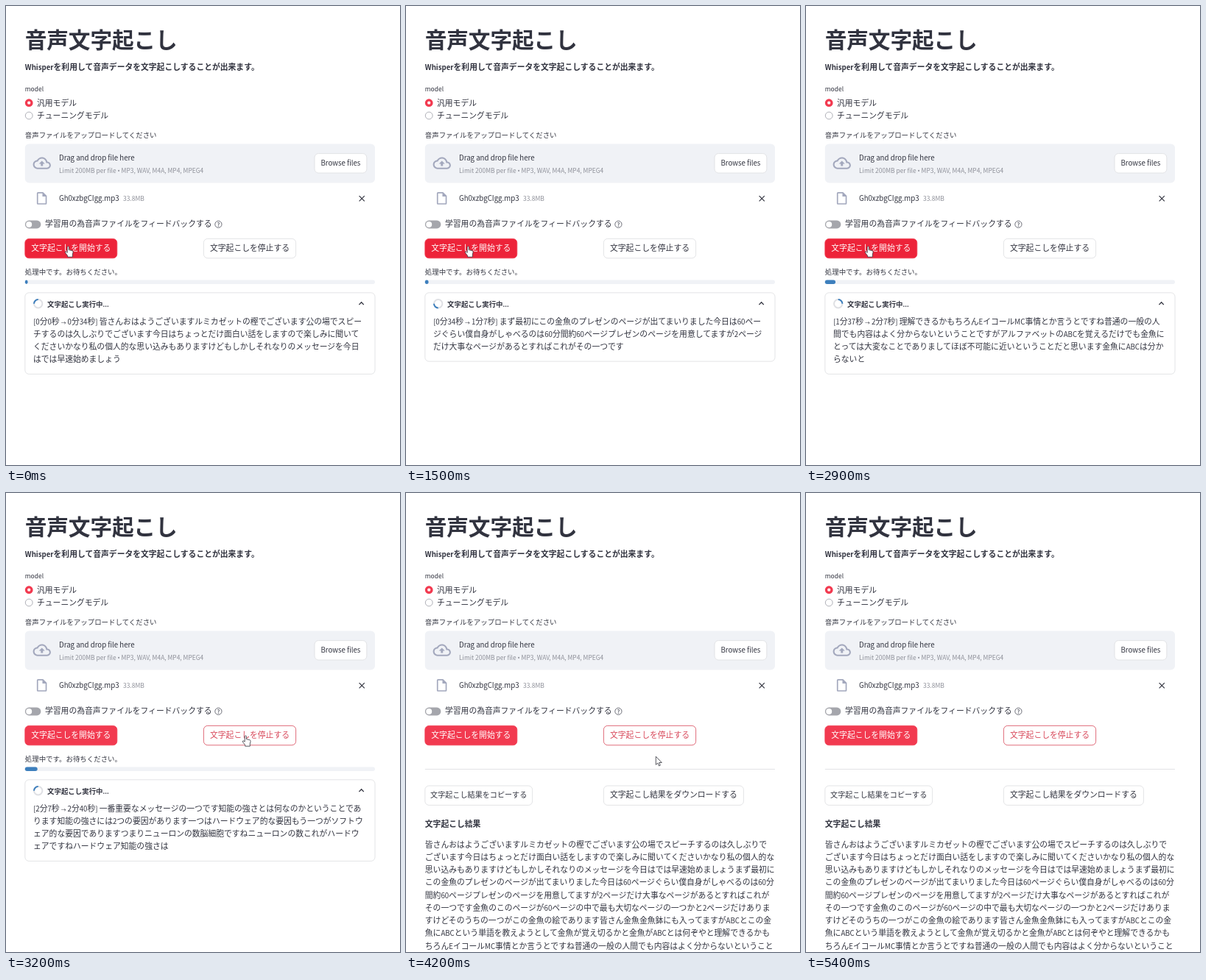
Write an HTML page that moves like this. It is 535 px wide and 624 px high and loops after 5.5 s.

```html
<!DOCTYPE html>
<html lang="ja">
<head>
<meta charset="utf-8">
<title>音声文字起こし</title>
<style>
  html, body { margin: 0; width: 100%; height: 100%; overflow: hidden; background: #fff; }
  svg { display: block; width: 535px; height: 624px; font-family: "Noto Sans CJK JP", "Noto Sans CJK", sans-serif; }
</style>
</head>
<body>
<svg viewBox="0 0 535 624"><g id="page"></g><g id="live"></g></svg>
<script>
const LOOP = 5500, STEP = 100, LEFT = 25.8, WIDTH = 475.2;
const SMALL = 9.45, BODY = 10.8, LINE = 17.28;
const INK = '#31333f', FAINT = '#8d8f98', EDGE = '#dcdde0', PANEL = '#f0f2f6';
const RED = '#f23a50', DARK_RED = '#ed2339', BLUE = '#3d7fbd', ICON = '#a3a8bd';

// Transcription segments
const FIRST = -110, PERIOD = 811, GROW = 200, DONE = 3500;
const percents = [0, 1, 1, 2, 3, 4];
const segments = [
  ['[0分0秒 → 0分34秒] 皆さんおはようございますルミカゼットの樫でございます公の場でスピー',
   'チするのは久しぶりでございます今日はちょっとだけ面白い話をしますので楽しみに聞いて',
   'くださいかなり私の個人的な思い込みもありますけどもしかしそれなりのメッセージを今日',
   'はでは早速始めましょう'],
  ['[0分34秒 → 1分7秒] まず最初にこの金魚のプレゼンのページが出てまいりました今日は60ペー',
   'ジぐらい僕自身がしゃべるのは60分間約60ページプレゼンのページを用意してますが2ページ',
   'だけ大事なページがあるとすればこれがその一つです'],
  ['[1分7秒 → 1分37秒] 金魚のこのページが60ページの中で最も大切なページの一つかと2ページだ',
   'けありますけどそのうちの一つがこの金魚の絵であります皆さん金魚金魚鉢にも入ってますが',
   'ABCとこの金魚にABCという単語を教えようとして金魚が覚え切るかと金魚がABCとは何ぞや',
   'と'],
  ['[1分37秒 → 2分7秒] 理解できるかもちろんEイコールMC事情とか言うとですね普通の一般の人',
   '間でも内容はよく分からないということですがアルファベットのABCを覚えるだけでも金魚に',
   'とっては大変なことでありましてほぼ不可能に近いということだと思います金魚にABCは分か',
   'らないと'],
  ['[2分7秒 → 2分40秒] 一番重要なメッセージの一つです知能の強さとは何なのかということであ',
   'ります知能の強さには2つの要因があります一つはハードウェア的な要因もう一つがソフトウ',
   'ェア的な要因でありますつまりニューロンの数脳細胞ですねニューロンの数これがハードウ',
   'ェアですねハードウェア知能の強さは']
];
const result = [
  '皆さんおはようございますルミカゼットの樫でございます公の場でスピーチするのは久しぶりで',
  'ございます今日はちょっとだけ面白い話をしますので楽しみに聞いてくださいかなり私の個人的な',
  '思い込みもありますけどもしかしそれなりのメッセージを今日はでは早速始めましょうまず最初に',
  'この金魚のプレゼンのページが出てまいりました今日は60ページぐらい僕自身がしゃべるのは60分',
  '間約60ページプレゼンのページを用意してますが2ページだけ大事なページがあるとすればこれが',
  'その一つです金魚のこのページが60ページの中で最も大切なページの一つかと2ページだけありま',
  'すけどそのうちの一つがこの金魚の絵であります皆さん金魚金魚鉢にも入ってますがABCとこの金',
  '魚にABCという単語を教えようとして金魚が覚え切るかと金魚がABCとは何ぞやと理解できるかも',
  'ちろんEイコールMC事情とか言うとですね普通の一般の人間でも内容はよく分からないということ'
];

// Latin runs and arrows are set smaller than the kanji around them.
function text(x, y, str, { size = BODY, fill = INK, weight = 400, anchor = 'start', spacing = 0 } = {}) {
  const runs = str
    .replace(/[ -~•]+/g, run => `<tspan font-size="${size * 0.895}">${run}</tspan>`)
    .replace('→', `<tspan font-size="${size * 0.62}">→</tspan>`);
  return `<text x="${x}" y="${y}" font-size="${size}" fill="${fill}" font-weight="${weight}" text-anchor="${anchor}" letter-spacing="${spacing}">${runs}</text>`;
}
const lines = (x, y, list) => list.map((line, i) => text(x, y + i * LINE, line)).join('');
const box = (x, y, w, h, fill, stroke = 'none', r = 5.4) =>
  `<rect x="${x}" y="${y}" width="${w}" height="${h}" rx="${r}" fill="${fill}" stroke="${stroke}" stroke-width=".8"/>`;
const circle = (x, y, r, fill, stroke = 'none', width = 1) =>
  `<circle cx="${x}" cy="${y}" r="${r}" fill="${fill}" stroke="${stroke}" stroke-width="${width}"/>`;
const path = (d, move, fill, stroke = 'none', width = 1) =>
  `<path d="${d}" transform="${move}" fill="${fill}" stroke="${stroke}" stroke-width="${width}"/>`;
const button = (x, y, w, label, { fill = '#fff', stroke = EDGE, ink = INK, size = BODY } = {}) =>
  box(x, y, w, 26.4, fill, stroke) +
  text(x + w / 2, y + 16.4, label, { fill: ink, size, anchor: 'middle' });

const cloud = 'M19.35 10.04C18.67 6.59 15.64 4 12 4 9.11 4 6.6 5.64 5.35 8.04 2.34 8.36 0 10.91 0 14c0 3.31 2.69 6 6 6h13c2.76 0 5-2.24 5-5 0-2.64-2.05-4.78-4.65-4.96zM19 18H6c-2.21 0-4-1.79-4-4 0-2.05 1.53-3.76 3.56-3.97l1.07-.11.5-.95C8.08 7.14 9.94 6 12 6c2.62 0 4.88 1.86 5.39 4.43l.3 1.5 1.53.11c1.56.1 2.78 1.41 2.78 2.96 0 1.65-1.35 3-3 3zM8 13h2.55v3h2.9v-3H16l-4-4z';
const sheet = 'M14 2H6c-1.1 0-2 .9-2 2v16c0 1.1.9 2 2 2h12c1.1 0 2-.9 2-2V8zM6 20V4h7v5h5v11z';
const hand = 'M-1.1.9Q0-.5 1.1.9V5L5.5 6Q7 6.5 6.8 8L6 11.5V14.6H-.6V13L-4 8.6Q-4 6.9-2.6 7.4L-1.1 8.6Z';
const arrow = 'M0 0V11.2L2.6 8.9 4.2 12.8 6 12 4.4 8.3H8Z';

document.getElementById('page').innerHTML =
  text(LEFT, 56.7, '音声文字起こし', { size: 29.7, weight: 700, spacing: -0.15 }) +
  text(LEFT, 87.4, 'Whisperを利用して音声データを文字起こしすることが出来ます。', { weight: 700 }) +
  text(LEFT, 115.9, 'model', { size: SMALL }) +
  circle(31.2, 131.7, 5.4, RED) + circle(31.2, 131.7, 2.1, '#fff') +
  text(42, 135.6, '汎用モデル') +
  circle(31.2, 149, 4.9, '#fff', '#b0b1b8') +
  text(42, 152.6, 'チューニングモデル') +
  text(LEFT, 179.4, '音声ファイルをアップロードしてください', { size: SMALL }) +
  box(LEFT, 187.4, WIDTH, 53, PANEL) +
  path(cloud, 'translate(36.6 201.4) scale(1.0125)', ICON) +
  text(72, 209.9, 'Drag and drop file here') +
  text(72, 226.9, 'Limit 200MB per file <tspan font-family="Noto Sans, sans-serif">•</tspan> MP3, WAV, M4A, MP4, MPEG4', { size: SMALL, fill: FAINT }) +
  button(419, 200.6, 70.8, 'Browse files') +
  path(sheet, 'translate(38.5 251.3) scale(.844)', ICON) +
  text(72, 264.8, 'Gh0xzbgCIgg.mp3') +
  text(159, 264.8, '33.8MB', { size: SMALL, fill: FAINT }) +
  path('M-3.6-3.6 3.6 3.6M3.6-3.6-3.6 3.6', 'translate(483.2 261.8)', 'none', INK, 1.2) +
  box(LEFT, 291.6, 21.6, 10.8, '#a5a6ac', 'none', 5.4) + circle(31.2, 297, 4, '#fff') +
  text(53, 300.4, '学習用の為音声ファイルをフィードバックする') +
  circle(288.4, 296.8, 4.6, 'none', '#6c6e78', 1) +
  text(288.4, 299.6, '?', { size: 8.6, fill: '#6c6e78', weight: 700, anchor: 'middle' });

function progress(t) {
  const index = Math.min(4, Math.floor((t - FIRST) / PERIOD));
  const p = Math.min(1, (t - FIRST - index * PERIOD) / GROW);
  const from = percents[index], to = percents[index + 1];
  const bar = WIDTH / 100 * (from + (to - from) * (1 - (1 - p) ** 2));
  const body = segments[index];
  return text(LEFT, 364.5, '処理中です。お待ちください。', { size: SMALL }) +
    box(LEFT, 372.5, WIDTH, 5.4, PANEL, 'none', 2.7) +
    box(LEFT, 372.5, bar, 5.4, BLUE, 'none', 2.7) +
    box(LEFT, 389.8, WIDTH, 41.5 + body.length * LINE, '#fff', EDGE) +
    circle(43.7, 404.8, 5.7, 'none', '#dfe0e4', 2) +
    path('M-4.03-4.03A5.7 5.7 0 0 1 4.03-4.03', `translate(43.7 404.8) rotate(${t * 0.9 - 45})`, 'none', BLUE, 2) +
    text(56, 408.5, '文字起こし実行中...', { size: SMALL, weight: 700 }) +
    path('M-3.2 1.7 0-1.6 3.2 1.7', 'translate(482.6 404.4)', 'none', INK, 1.3) +
    lines(37, 432.5, body);
}

const finished = () =>
  path(`M0 0H${WIDTH}`, `translate(${LEFT} 375.5)`, 'none', '#e2e3e6') +
  button(LEFT, 398, 145.8, '文字起こし結果をコピーする', { size: 10.1 }) +
  button(268.4, 398, 190, '文字起こし結果をダウンロードする') +
  text(LEFT, 453.7, '文字起こし結果', { weight: 700 }) +
  lines(LEFT, 481.5, result);

function ease(t, start, end) {
  const p = Math.max(0, Math.min(1, (t - start) / (end - start)));
  return p * p * (3 - 2 * p);
}

function draw(t) {
  const across = ease(t, 2900, 3200), away = ease(t, DONE, 4000);
  const x = 84.3 + 241 * across + 14 * away;
  const y = 326.6 + 3 * across + 28.6 * away;
  const onStart = x < 151, onStop = x > 268 && y < 343;
  const pressed = x > 268;
  const pointer = t < 4800
    ? path(onStart || onStop ? hand : arrow, `translate(${x} ${y})`, '#fff', '#30313a', 0.8) : '';
  return button(LEFT, 316.4, 125, '文字起こしを開始する', { fill: onStart ? DARK_RED : RED, stroke: RED, ink: '#fff' }) +
    button(268.4, 316.4, 125.2, '文字起こしを停止する', pressed ? { stroke: '#d8485a', ink: '#d8485a' } : {}) +
    (t < DONE ? progress(t) : finished()) + pointer;
}

const live = document.getElementById('live');
let shown = -1;
function tick() {
  const t = Math.floor(performance.now() % LOOP / STEP) * STEP;
  if (t !== shown) live.innerHTML = draw(shown = t);
  requestAnimationFrame(tick);
}
tick();
</script>
</body>
</html>
```
